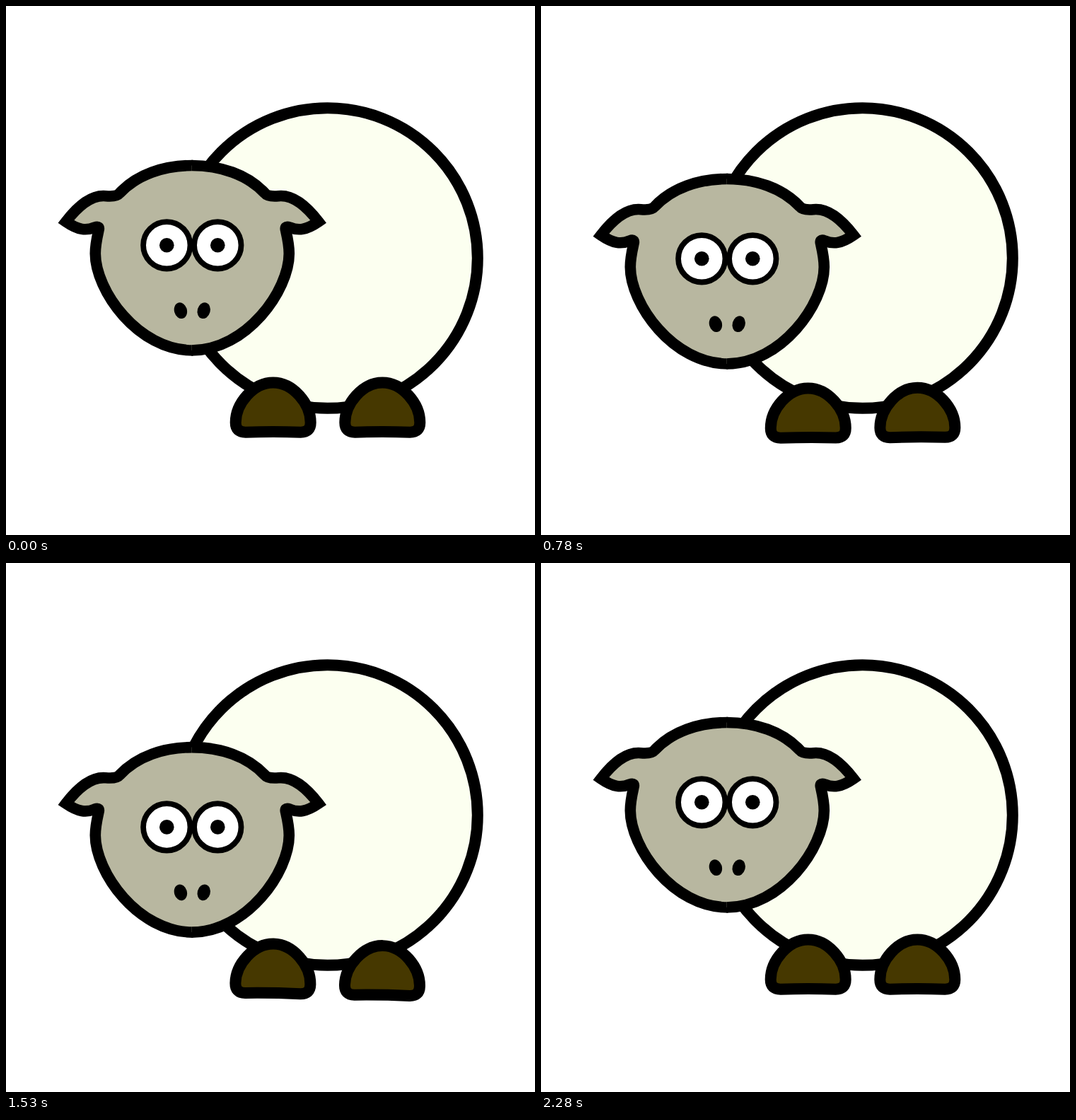
Recreate the animation shown at these times as an HTML page. Size 748 by 748 pixels, loop 2.31 s.

```html
<!DOCTYPE html>
<html lang="en">
<head>
<meta charset="utf-8">
<title>Sheep</title>
<style>
  html, body { margin: 0; width: 100%; height: 100%; overflow: hidden; background: #fff; }
  svg { display: block; width: 100%; height: 100%; }
</style>
</head>
<body>
<svg viewBox="0 0 748 748" stroke="#000" stroke-width="16">
  <defs>
    <path id="foot" d="M0 532.5C28 532.5 53 562 53 589Q53 602.7 39 602.7Q0 601.5 -39 602.7Q-53 602.7 -53 589C-53 562 -28 532.5 0 532.5Z"/>
    <!-- Left halves, mirrored below; the face reaches 1px past the middle to hide the seam -->
    <path id="face" fill="#b8b7a0" stroke-width="15.6" stroke-miterlimit="6"
      d="M1 225.5C-40 225.5 -78 238 -103 265Q-107 270 -122 268.7C-144 266.5 -164 286 -178.5 305C-161 317 -150 318 -138 313Q-130 310 -132.5 318Q-137 338 -137 350C-137 402 -77 487 1 487"/>
    <g id="features">
      <circle cx="-36" cy="338.3" r="33.2" fill="#fff" stroke-width="7.8"/>
      <circle cx="-36" cy="338.3" r="10.3" fill="#000" stroke="none"/>
      <ellipse rx="9" ry="11.5" fill="#000" stroke="none" transform="translate(-16.4 430.7) rotate(-15)"/>
    </g>
  </defs>
  <circle cx="454.5" cy="356.5" r="212.3" fill="#fcfff0"/>
  <g id="feet" fill="#463800">
    <use href="#foot" x="377.7"/>
    <use href="#foot" x="532.3"/>
  </g>
  <g id="head">
    <use href="#face"/>
    <use href="#face" transform="scale(-1 1)"/>
    <use href="#features"/>
    <use href="#features" transform="scale(-1 1)"/>
  </g>
</svg>
<script>
const LOOP = 2310, STEP = 30, END = LOOP - STEP;
const LOW = 1500, NOD = 36.5;                      // head dip
const LEAN = 4.3, RIGHT = 480, LEFT = 1050, BACK = 1830; // rocking feet

const head = document.getElementById("head");
const feet = document.getElementById("feet");
const ramp = (t, from, to) => (t - from) / (to - from);

const nod = t => NOD * Math.min(t / LOW, ramp(t, END, LOW));

// Lean right, left, right again, then settle
function lean(t) {
  if (t < RIGHT) return ramp(t, 0, RIGHT);
  if (t < LEFT) return 1 - 2 * ramp(t, RIGHT, LEFT);
  if (t < BACK) return 2 * ramp(t, LEFT, BACK) - 1;
  return ramp(t, END, BACK);
}

// The feet sink as they pass through level
const sink = (t, k) => t < RIGHT || t > BACK ? 1.6 * k : 7.6 - 6 * k * k;

function draw(now) {
  const t = Math.floor((now % LOOP) / STEP) * STEP;
  const k = lean(t);
  head.setAttribute("transform", `translate(263.3 ${nod(t)})`);
  feet.setAttribute("transform", `translate(0 ${sink(t, k)}) rotate(${LEAN * k} 455 570)`);
}

let start;
function tick(now) {
  start ??= now;
  draw(now - start);
  requestAnimationFrame(tick);
}
draw(0);
requestAnimationFrame(tick);
</script>
</body>
</html>
```
